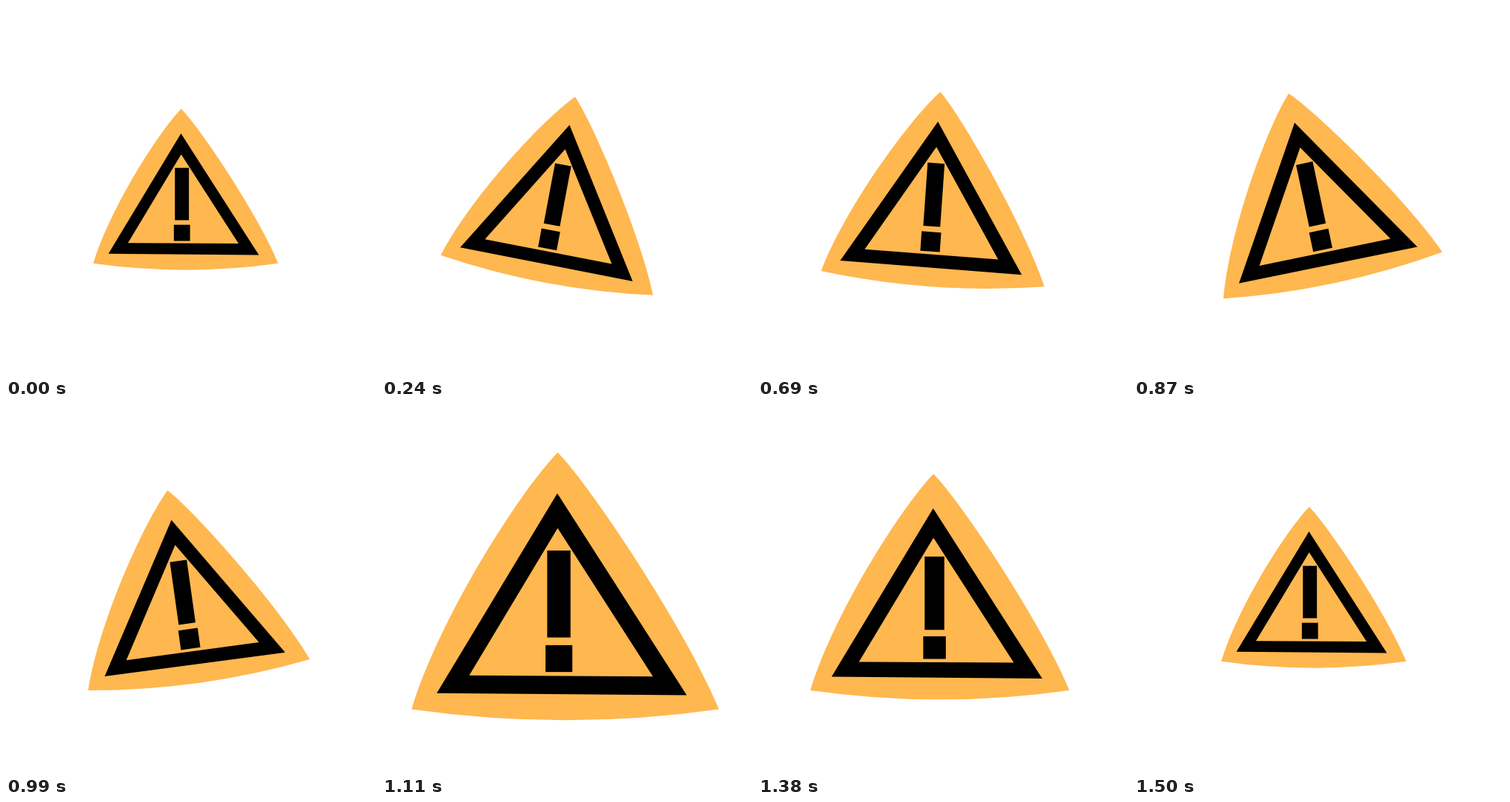
An HTML page that plays this animation: 500x500 px, repeating every 1530 ms.

```html
<!DOCTYPE html>
<html lang="en">
<head>
<meta charset="utf-8">
<title>Warning sign</title>
<style>
  html, body { margin: 0; width: 100%; height: 100%; overflow: hidden; background: #fff; }
  svg { display: block; width: 100%; height: 100%; }
</style>
</head>
<body>
<svg viewBox="0 0 500 500">
  <g id="sign">
    <path fill="#ffb74f" d="M237.5 50 C281 93 423 304 473.5 426 Q249 458 23.5 426 C61.5 299 177 113 237.5 50Z"/>
    <path fill-rule="evenodd" d="M237 110 L426.5 405.5 L60.5 402.5Z M237.5 161 L377 378 L108 376.5Z"/>
    <rect x="222.2" y="193.7" width="34.1" height="127.3"/>
    <rect x="219.7" y="332.2" width="39.3" height="39.3"/>
  </g>
</svg>
<script>
  const LOOP = 1530, STEP = 30, BEAT = 150;
  const CX = 235.8, CY = 250;
  const DRAWN = 1.8; // scale at which the shapes are drawn
  const SWING = 20;  // degrees

  const sign = document.getElementById('sign');

  // 0 before start, 1 after end, linear between
  const ramp = (t, start, end) => Math.min(1, Math.max(0, (t - start) / (end - start)));

  // settle a little larger, swell to double, shrink back
  const scaleAt = t =>
    1 + 0.21 * ramp(t, 0, 300) + 0.79 * ramp(t, 990, 1200) - ramp(t, 1200, 1500);

  // lean right, swing three times, come upright
  function angleAt(t) {
    const beat = t / BEAT;
    if (beat < 3) return SWING * beat / 3;
    if (beat < 6) return SWING * (2 * Math.abs((beat - 3) % 2 - 1) - 1);
    return SWING * Math.min(0, beat - 7);
  }

  function draw() {
    const t = Math.floor((performance.now() % LOOP + 0.01) / STEP) * STEP;
    sign.setAttribute('transform',
      `translate(${CX} ${CY}) rotate(${angleAt(t)}) scale(${scaleAt(t) / DRAWN}) translate(${-CX} ${-CY})`);
    requestAnimationFrame(draw);
  }
  draw();
</script>
</body>
</html>
```
